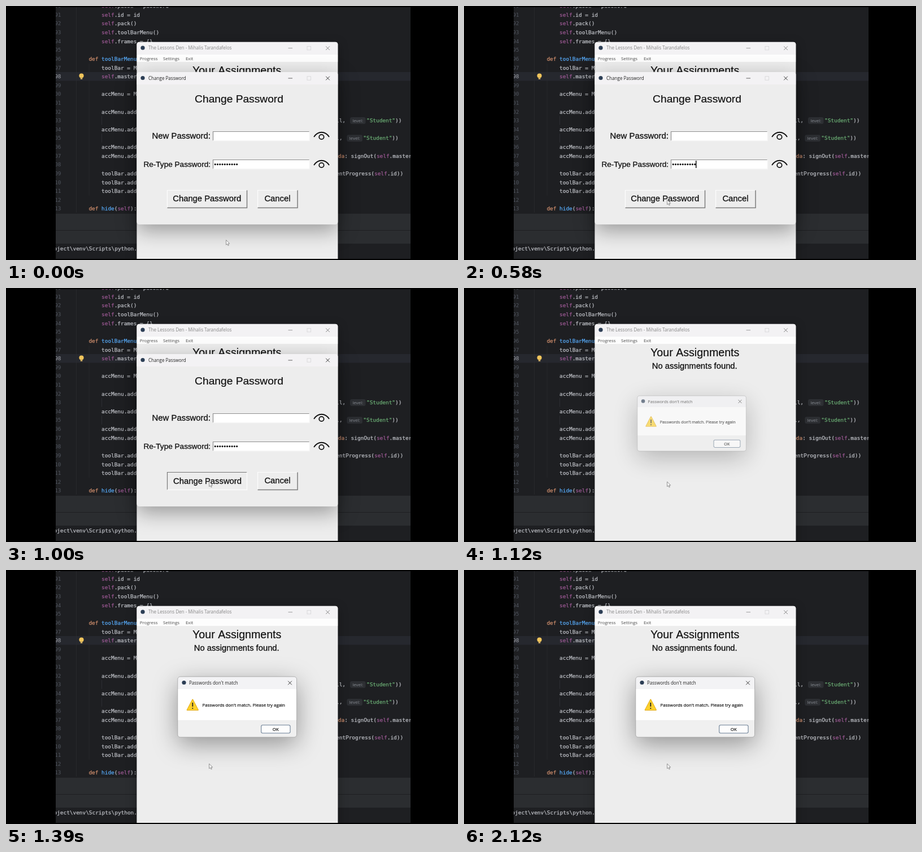
These frames come from a looping animation (800 by 450 pixels, 2180 ms). An HTML page with a canvas:

```html
<!DOCTYPE html>
<html lang="en">
<head>
<meta charset="utf-8">
<title>Change password dialog</title>
<style>
html, body { margin: 0; width: 100%; height: 100%; overflow: hidden; background: #000; }
canvas { display: block; width: 100vw; height: 100vh; }
</style>
</head>
<body>
<canvas id="stage" width="800" height="450"></canvas>
<script>
const LOOP = 2180;
const UI = '"Open Sans", "Noto Sans", sans-serif';
const ARIAL = '"Liberation Sans", Arial, sans-serif';
const MONO = '"DejaVu Sans Mono", monospace';
const CHAR = 5.67, ROW = 15.62;
const INK = '#111', FACE = '#ededed', BAR = '#f3f2f4';
const LEFT_EDGE = 231.4, WIDTH = 356;

const stage = document.getElementById('stage');
const main = stage.getContext('2d');
const layer = document.createElement('canvas');
layer.width = 800;
layer.height = 450;
const layerCtx = layer.getContext('2d');
let g = main;

const clamp = (v) => Math.min(1, Math.max(0, v));
const progress = (t, from, to) => clamp((t - from) / (to - from));
const easeOut = (u) => 1 - (1 - u) ** 3;
const easeInOut = (u) => u * u * (3 - 2 * u);

function box(x, y, w, h, color) {
  g.fillStyle = color;
  g.fillRect(x, y, w, h);
}

// bold is the width of an extra outline that thickens the glyphs a little
function text(s, x, y, size, color = INK, family = UI, align = 'left', bold = 0) {
  g.font = `${size}px ${family}`;
  g.textAlign = align;
  g.fillStyle = color;
  g.fillText(s, x, y);
  if (!bold) return;
  g.strokeStyle = color;
  g.lineWidth = bold;
  g.lineJoin = 'round';
  g.strokeText(s, x, y);
  g.lineJoin = 'miter';
}

function line(points, color, width = 1) {
  g.beginPath();
  points.forEach(([x, y]) => g.lineTo(x, y));
  g.strokeStyle = color;
  g.lineWidth = width;
  g.stroke();
}

function dot(x, y, r, color) {
  g.beginPath();
  g.arc(x, y, r, 0, 7);
  g.fillStyle = color;
  g.fill();
}

// Paints a group off screen, scaled about a point, then blends it in as one.
function group(alpha, scale, cx, cy, paint) {
  if (alpha <= 0) return;
  g = layerCtx;
  g.clearRect(0, 0, 800, 450);
  g.save();
  g.translate(cx, cy);
  g.scale(scale, scale);
  g.translate(-cx, -cy);
  paint();
  g.restore();
  g = main;
  g.globalAlpha = alpha;
  g.drawImage(layer, 0, 0);
  g.globalAlpha = 1;
}

// ---- editor ----

const rowY = (n) => 15.5 + ROW * (n - 191);

function code(x, y, s) {
  const tokens = s.match(/"[^"]*"|\w+|[^\w"]+/g);
  let prev = '';
  for (const tok of tokens) {
    let color = '#bcbec4';
    if (tok === 'self') color = '#9a5892';
    else if (tok === 'def' || tok === 'bda') color = '#cf8e6d';
    else if (tok[0] === '"') color = '#6aab73';
    else if (prev === 'def' && tok.trim()) color = '#56a8f5';
    text(tok, x, y + 3.3, 9.42, color, MONO, 'left', 0.25);
    x += tok.length * CHAR;
    if (tok.trim()) prev = tok;
  }
}

const LEFT = {
  190: 'self.passw = password',
  191: 'self.id = id',
  192: 'self.pack()',
  193: 'self.toolBarMenu()',
  194: 'self.frames = {}',
  196: 'def toolBarMenu(self):',
  197: 'toolBar = Menu(',
  198: 'self.master.config(',
  200: 'accMenu = Menu(',
  202: 'accMenu.add_command',
  204: 'accMenu.add_command',
  206: 'accMenu.add_command',
  207: 'accMenu.add_command',
  209: 'toolBar.add_command',
  210: 'toolBar.add_command',
  211: 'toolBar.add_command',
  213: 'def hide(self):'
};

function hintRow(n, x) {
  const y = rowY(n);
  code(x, y, 'll,');
  g.beginPath();
  g.roundRect(x + 25, y - 6, 27.5, 12, 3);
  g.fillStyle = '#2d2f33';
  g.fill();
  text('level:', x + 38.7, y + 2.7, 8, '#868a91', UI, 'center');
  code(x + 54, y, '"Student"))');
}

function editor() {
  box(88, 2, 628, 446, '#1e1f22');
  box(88, 117, 628, 15.5, '#26282e');
  box(124, 2, 0.7, 364, '#2b2d31');
  box(146.7, 102, 0.7, 234, '#2b2d31');
  for (const n of [203, 205]) box(169, rowY(n) - 8, 0.7, ROW, '#34363a');

  for (let n = 190; n <= 213; n++) {
    const y = rowY(n);
    text(n, 97.5, y + 3.3, 9.42, n === 198 ? '#a1a3ab' : '#4f545d', MONO, 'right');
    if (LEFT[n]) code(LEFT[n].startsWith('def') ? 146.4 : 169, y, LEFT[n]);
  }
  hintRow(203, 584);
  hintRow(205, 584 - CHAR);
  code(582.2, rowY(207), 'bda: signOut(self.master');
  code(584, rowY(209), 'entProgress(self.id))');

  dot(133.5, 123.6, 4.1, '#f2c55c');
  box(131.7, 127.4, 3.6, 2.4, '#d9b566');

  box(88, 368, 628, 53, '#2b2d30');
  box(88, 397, 628, 1, '#1e1f22');
  code(84.5, 430, 'oject\\venv\\Scripts\\python.exe');
}

// ---- windows ----

function frame(x, y, w, h, blur, drop, shade) {
  g.save();
  g.shadowColor = `rgba(0,0,0,${shade})`;
  g.shadowBlur = blur;
  g.shadowOffsetY = drop;
  g.beginPath();
  g.roundRect(x, y, w, h, 4.5);
  g.fillStyle = FACE;
  g.fill();
  g.restore();
  g.beginPath();
  g.roundRect(x, y, w, h, 4.5);
  g.save();
  g.clip();
}

function outline(x, y, w, h, r, color, width) {
  g.beginPath();
  g.roundRect(x, y, w, h, r);
  g.strokeStyle = color;
  g.lineWidth = width;
  g.stroke();
}

function closeMark(x, y, color) {
  const r = 3.3;
  line([[x - r, y - r], [x + r, y + r]], color, 0.9);
  line([[x + r, y - r], [x - r, y + r]], color, 0.9);
}

function titleBar(y, title, color, mark) {
  box(LEFT_EDGE, y, WIDTH, 22, BAR);
  dot(242, y + 10.5, 3.6, '#2c3e55');
  text(title, 252, y + 13.6, 8.07, color);
  line([[499.5, y + 11], [507, y + 11]], mark, 0.7);
  g.strokeStyle = '#d4d4d6';
  g.lineWidth = 0.8;
  g.strokeRect(533, y + 7.8, 6.4, 6.4);
  closeMark(569.5, y + 11, mark);
}

function mainWindow() {
  frame(LEFT_EDGE, 63.7, WIDTH, 400, 18, 5, 0.35);
  titleBar(63.7, 'The Lessons Den - Mihalis Tarandafelos', '#858585', '#777');
  box(LEFT_EDGE, 86, WIDTH, 13, '#fdfdfd');
  text('Progress', 236.7, 96, 7.83, '#4a4a4a');
  text('Settings', 278, 96, 7.83, '#4a4a4a');
  text('Exit', 318, 96, 7.83, '#4a4a4a');
  text('Your Assignments', 408.7, 121, 19.6, INK, ARIAL, 'center', 0.2);
  text('No assignments found.', 408.2, 143.3, 14.76, INK, ARIAL, 'center', 0.3);
  g.restore();
}

function bevel(x, y, w, h, light, dark) {
  line([[x, y + h], [x, y], [x + w, y]], light, 1.2);
  line([[x + w, y], [x + w, y + h], [x, y + h]], dark, 1.5);
}

function button(x, w, label, down) {
  if (down) bevel(x, 326.5, w, 31, '#777', '#fafafa');
  else bevel(x, 326.5, w, 31, '#fcfcfc', '#7c7c7c');
  const d = down ? 0.8 : 0;
  text(label, x + w / 2 - 0.3 + d, 346.4 + d, 14.8, INK, ARIAL, 'center', 0.3);
}

function field(label, size, y) {
  text(label, 362, y + 4.6, size, INK, ARIAL, 'right', 0.3);
  box(366.5, y - 7.5, 170.5, 16, '#fff');
  bevel(366.5, y - 7.5, 170.5, 16, '#8e8e8e', '#f8f8f8');

  g.strokeStyle = INK;
  g.lineWidth = 1.8;
  g.beginPath();
  g.moveTo(545, y + 2);
  g.bezierCurveTo(552, y - 9, 565, y - 9, 572, y + 2);
  g.stroke();
  g.beginPath();
  g.arc(558.4, y + 2, 4.2, 0, 7);
  g.stroke();
}

function passwordDialog(caret, down) {
  frame(LEFT_EDGE, 117, WIDTH, 270, 36, 11, 0.36);
  titleBar(117, 'Change Password', '#222', '#222');
  text('Change Password', 412.5, 171.3, 19.2, INK, ARIAL, 'center', 0.2);
  field('New Password:', 14.9, 230);
  field('Re-Type Password:', 13.6, 280);
  for (let i = 0; i < 10; i++) dot(370.2 + i * 4.27, 280.6, 1.55, INK);
  if (caret) box(410, 274, 1.4, 13, '#000');
  button(285.5, 141, 'Change Password', down);
  button(445.5, 70.5, 'Cancel', false);
  g.restore();
}

function warningIcon() {
  g.beginPath();
  g.moveTo(330.3, 229.5);
  g.lineTo(340, 248);
  g.lineTo(320.6, 248);
  g.closePath();
  g.lineJoin = 'round';
  g.lineWidth = 1.8;
  g.strokeStyle = '#e3ac1c';
  g.stroke();
  g.fillStyle = '#fdd12c';
  g.fill();
  g.lineJoin = 'miter';
  line([[330.3, 235], [330.3, 242]], '#222', 1.8);
  dot(330.3, 245, 1.1, '#222');
}

function messageBox() {
  frame(303.8, 189, 210.7, 107.2, 44, 12, 0.38);
  box(303, 189, 212, 22, '#f3f3f5');
  box(303, 211, 212, 55, '#fff');
  box(303, 266, 212, 31, '#f0f0f0');
  dot(315, 199.5, 3.6, '#2c3e55');
  text("Passwords don't match", 324, 203, 8.02, '#222');
  closeMark(502.5, 200, '#222');
  warningIcon();
  text("Passwords don't match. Please try again", 347.5, 242.2, 7.85, '#222', UI, 'left', 0.25);
  box(452, 275, 51, 14, '#fdfdfd');
  outline(451.7, 274.7, 51.3, 14.3, 2.5, '#6b7f95', 1.1);
  text('OK', 477.3, 284.8, 7.9, '#222', UI, 'center', 0.25);
  g.restore();
  outline(303.8, 189, 210.7, 107.2, 4.5, 'rgba(90,90,90,0.5)', 0.8);
}

function pointer(x, y) {
  const shape = [[0, 0], [0, 8.6], [2, 6.9], [3.4, 9.9], [4.8, 9.2], [3.5, 6.4], [6, 6.2]];
  g.beginPath();
  shape.forEach(([dx, dy]) => g.lineTo(x + dx, y + dy));
  g.closePath();
  g.fillStyle = '#fafafa';
  g.fill();
  g.strokeStyle = '#777';
  g.lineWidth = 0.8;
  g.stroke();
}

// ---- timeline ----

function draw(t) {
  g = main;
  box(0, 0, 800, 450, '#000');
  g.save();
  g.beginPath();
  g.rect(88, 2, 628, 446);
  g.clip();
  editor();
  mainWindow();

  const leave = progress(t, 1045, 1115);
  const caret = t >= 250 && t < 850;
  const down = t >= 930 && t < 1040;
  group(1 - leave, 1 - 0.06 * leave, 409.5, 252, () => passwordDialog(caret, down));

  // the opening pauses briefly while the box is half shown
  const shown = t >= 1120 && t < 1180 ? 1120 : t;
  const open = progress(shown, 1060, 1320);
  group(clamp(open * 2.7), 1 - 0.1886 * (1 - easeOut(open)), 338.6, 212, messageBox);

  const move = easeInOut(progress(t, 0, 520));
  pointer(389.6 - 30 * move, 414.6 - 71.4 * move);
  g.restore();
}

const start = performance.now();
function tick() {
  draw((performance.now() - start) % LOOP);
  requestAnimationFrame(tick);
}
tick();
</script>
</body>
</html>
```
